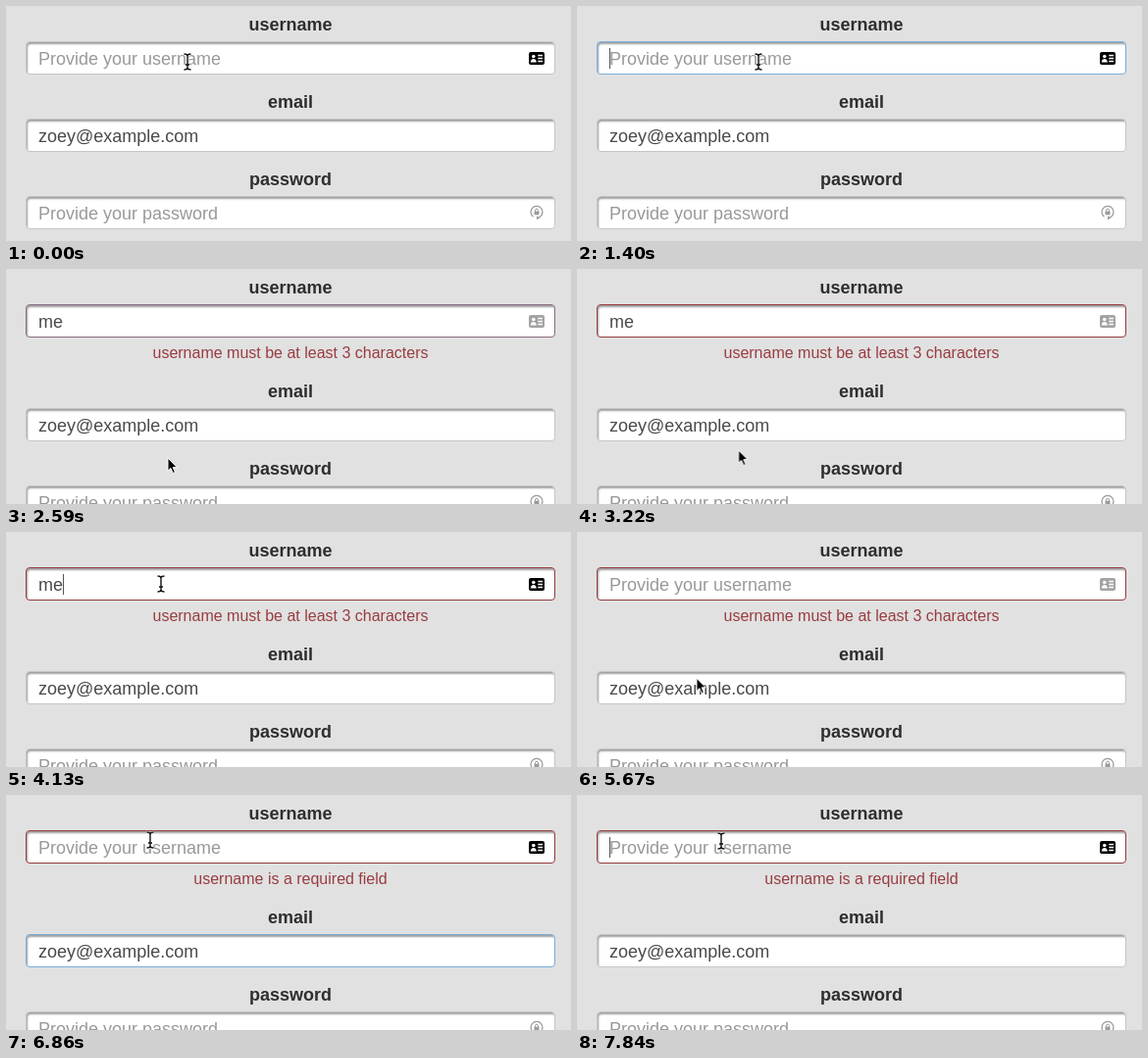
These frames come from a looping animation (576 px wide and 240 px high, 8000 ms). An HTML page:

```html
<!DOCTYPE html>
<html lang="en">
<head>
<meta charset="utf-8">
<title>Form validation</title>
<style>
:root { --grey: #c6c6c6; --blue: #78aedd; --red: #963b3d; }
html, body { margin: 0; width: 100%; height: 100%; overflow: hidden; }
body {
  position: relative; background: #e1e1e1; color: #4a4a4a; cursor: default;
  font: 18px/34px "Liberation Sans", Arial, sans-serif; white-space: pre;
}
body *, body { box-sizing: border-box; }
.row, .label, .field, .error, .text, .caret, .stage { position: absolute; }
.row { left: 20px; width: 540px; height: 70px; }
.label { left: 0; width: 100%; top: 0; text-align: center; font-weight: bold; line-height: 38px; color: #2e2e2e; }
.field {
  left: 0; top: 36px; width: 540px; height: 34px; border: 1px solid var(--grey); border-radius: 4px;
  background: #fff; box-shadow: inset 1px 2px 2px rgba(0, 0, 0, .38);
}
.text { left: 12px; top: 0; }
.hint { color: #999; }
.caret { left: 12px; top: 6px; width: 1px; height: 21px; background: #555; opacity: 0; }
.error { left: 20px; width: 540px; top: 75px; text-align: center; font-size: 16px; line-height: 21px; color: #993c40; }
.stage { left: 0; top: 0; width: 576px; height: 240px; overflow: hidden; }

/* one shared 8 s clock; .cut marks hard changes */
.anim { animation: 8s ease infinite; }
.cut { animation: 8s step-end infinite; }

#lower { left: 0; top: 0; animation-name: push; }
#user { animation-name: userBorder; }
#mail { animation-name: mailBorder; }
#hint { animation-name: hint; }
#typed { animation-name: typed; }
#lastChar { animation-name: lastChar; }
#userCaret { animation-name: userCaret; }
#mailCaret { left: 175px; animation-name: mailCaret; }
#short { animation-name: short; }
#required { animation-name: required; }
#card { animation-name: card; }
#pointer { animation-name: move; }
#shown { animation-name: shown; }
#beam { animation-name: beam; }
#arrow { animation-name: arrow; }
#ring { animation-name: ring; }

@keyframes push { 0% { transform: none } 32.375%, 100% { transform: translateY(27px) } }
@keyframes userBorder {
  0%, 3.5% { border-color: var(--grey) }
  6.125%, 31.5% { border-color: var(--blue) }
  34.125%, 100% { border-color: var(--red) }
}
@keyframes mailBorder {
  0%, 73.5% { border-color: var(--grey) }
  76.125%, 95.375% { border-color: var(--blue) }
  98%, 100% { border-color: var(--grey) }
}
@keyframes hint { 0% { opacity: 1 } 21% { opacity: 0 } 61.25%, 100% { opacity: 1 } }
@keyframes typed { 0% { opacity: 0 } 21% { opacity: 1 } 61.25%, 100% { opacity: 0 } }
@keyframes lastChar { 0% { opacity: 0 } 22.75% { opacity: 1 } 58.625%, 100% { opacity: 0 } }
@keyframes userCaret {
  0% { opacity: 0; transform: none }
  3.5% { opacity: 1; transform: none }
  10.5% { opacity: 0; transform: none }
  17.5% { opacity: 1; transform: none }
  21% { opacity: 1; transform: translateX(15px) }
  22.75% { opacity: 1; transform: translateX(25px) }
  29.75% { opacity: 0; transform: translateX(25px) }
  50.75% { opacity: 1; transform: translateX(25px) }
  57.75% { opacity: 0; transform: none }
  63% { opacity: 1; transform: none }
  69.125% { opacity: 0; transform: none }
  95.375%, 100% { opacity: 1; transform: none }
}
@keyframes mailCaret {
  0% { opacity: 0 } 74.375% { opacity: 1 } 80.5% { opacity: 0 }
  87.5% { opacity: 1 } 93.625%, 100% { opacity: 0 }
}
@keyframes short { 0% { opacity: 0 } 32.375% { opacity: 1 } 74.375%, 100% { opacity: 0 } }
@keyframes required { 0% { opacity: 0 } 74.375%, 100% { opacity: 1 } }
@keyframes card {
  0% { fill: #000 } 27.125% { fill: #a3a3a3 } 46.7% { fill: #000 }
  70% { fill: #a3a3a3 } 83.4%, 100% { fill: #000 }
}
@keyframes move {
  0%, 26% { transform: translate(185px, 57px); animation-timing-function: ease-in-out }
  30.625%, 38.5% { transform: translate(165px, 193px); animation-timing-function: ease-in-out }
  49%, 68.25% { transform: translate(158px, 53px); animation-timing-function: ease-in }
  70.875% { transform: translate(122px, 149px); animation-timing-function: ease-out }
  72.625%, 77% { transform: translate(115px, 171px); animation-timing-function: ease-in-out }
  85.75% { transform: translate(147px, 46px) }
  87.5%, 100% { transform: translate(147px, 47px) }
}
@keyframes shown {
  0% { opacity: 1 } 21% { opacity: 0 } 26.25% { opacity: 1 }
  56.875% { opacity: 0 } 69.125%, 100% { opacity: 1 }
}
@keyframes beam {
  0% { opacity: 1 } 27.125% { opacity: 0 } 40.9% { opacity: 1 } 43% { opacity: 0 } 46.7% { opacity: 1 }
  70% { opacity: 0 } 71.75% { opacity: 1 } 80.5% { opacity: 0 } 83.4%, 100% { opacity: 1 }
}
@keyframes arrow {
  0% { opacity: 0 } 27.125% { opacity: 1 } 40.9% { opacity: 0 } 43% { opacity: 1 } 46.7% { opacity: 0 }
  70% { opacity: 1 } 71.75% { opacity: 0 } 80.5% { opacity: 1 } 83.4%, 100% { opacity: 0 }
}
@keyframes ring {
  0% { opacity: 0; r: 17.5px }
  3.5% { opacity: 1; r: 17.5px }
  5.25% { opacity: 0; r: 17.5px }
  31.5% { opacity: 1; r: 21.5px }
  32.375% { opacity: 0; r: 17.5px }
  49.875% { opacity: 1; r: 17.5px }
  51.625% { opacity: 0; r: 17.5px }
  73.5% { opacity: 1; r: 17.5px }
  75.25% { opacity: 0; r: 17.5px }
  95.375% { opacity: 1; r: 17.5px }
  97.125%, 100% { opacity: 0; r: 17.5px }
}
</style>
</head>
<body>
<div class="stage">
  <div class="row" style="top:0">
    <div class="label">username</div>
    <div class="field anim" id="user">
      <span class="text hint cut" id="hint">Provide your username</span>
      <span class="text cut" id="typed">m<span class="cut" id="lastChar">e</span></span>
      <div class="caret cut" id="userCaret"></div>
    </div>
  </div>
  <div class="error cut" id="short">username must be at least 3 characters</div>
  <div class="error cut" id="required">username is a required field</div>

  <div class="stage cut" id="lower" style="overflow:visible">
    <div class="row" style="top:79px">
      <div class="label">email</div>
      <div class="field anim" id="mail">
        <span class="text">zoey@example.com</span>
        <div class="caret cut" id="mailCaret"></div>
      </div>
    </div>
    <div class="row" style="top:158px">
      <div class="label">password</div>
      <div class="field"><span class="text hint">Provide your password</span></div>
    </div>
    <svg class="stage" viewBox="0 0 576 240" fill="none" stroke="#9b9b9b" stroke-width="1.3">
      <path d="M537.5 215.2A6 6 0 1 1 544.5 215.2L541 217.2"/>
      <path d="M541 214.2V218.2L544 216.6Z" fill="#9b9b9b" stroke="none"/>
      <path d="M539.5 210V208.7A1.5 1.5 0 0 1 542.5 208.7V210" stroke-width="1"/>
      <rect x="538.5" y="209.7" width="5" height="3.6" fill="#9b9b9b" stroke="none"/>
    </svg>
  </div>

  <svg class="stage" viewBox="0 0 576 240">
    <rect class="cut" id="card" x="533" y="47" width="16" height="13" rx="2"/>
    <g fill="#fff">
      <circle cx="537.8" cy="51.5" r="1.8"/>
      <path d="M534.8 57.5Q535 54 537.8 54T540.8 57.5Z"/>
      <path d="M542.3 49.8H547V51.2H542.3ZM542.3 52.8H547V54.2H542.3ZM542.3 55.8H547V57.2H542.3Z"/>
    </g>
    <g class="anim" id="pointer">
      <circle class="cut" id="ring" r="17.5" fill="none" stroke="#111" stroke-width="1.5"/>
      <g class="cut" id="shown">
        <g class="cut" id="beam" fill="none">
          <path id="bar" d="M-3.5 -8Q-.5 -8 0 -6.3Q.5 -8 3.5 -8M0 -6.5V6.5M-3.5 8Q-.5 8 0 6.3Q.5 8 3.5 8M-2 3H2" stroke="#fff" stroke-opacity=".75" stroke-width="2.6"/>
          <use href="#bar" style="stroke:#111"/>
          <path d="M-3.5 -8Q-.5 -8 0 -6.3Q.5 -8 3.5 -8M0 -6.5V6.5M-3.5 8Q-.5 8 0 6.3Q.5 8 3.5 8M-2 3H2" stroke="#111" stroke-width="1.4"/>
        </g>
        <path class="cut" id="arrow" d="M0 0V13.2L3 10.4L5.2 15.5L7.4 14.5L5.2 9.6H9.3Z" fill="#000" stroke="#fff" stroke-width="1"/>
      </g>
    </g>
  </svg>
</div>
</body>
</html>
```
